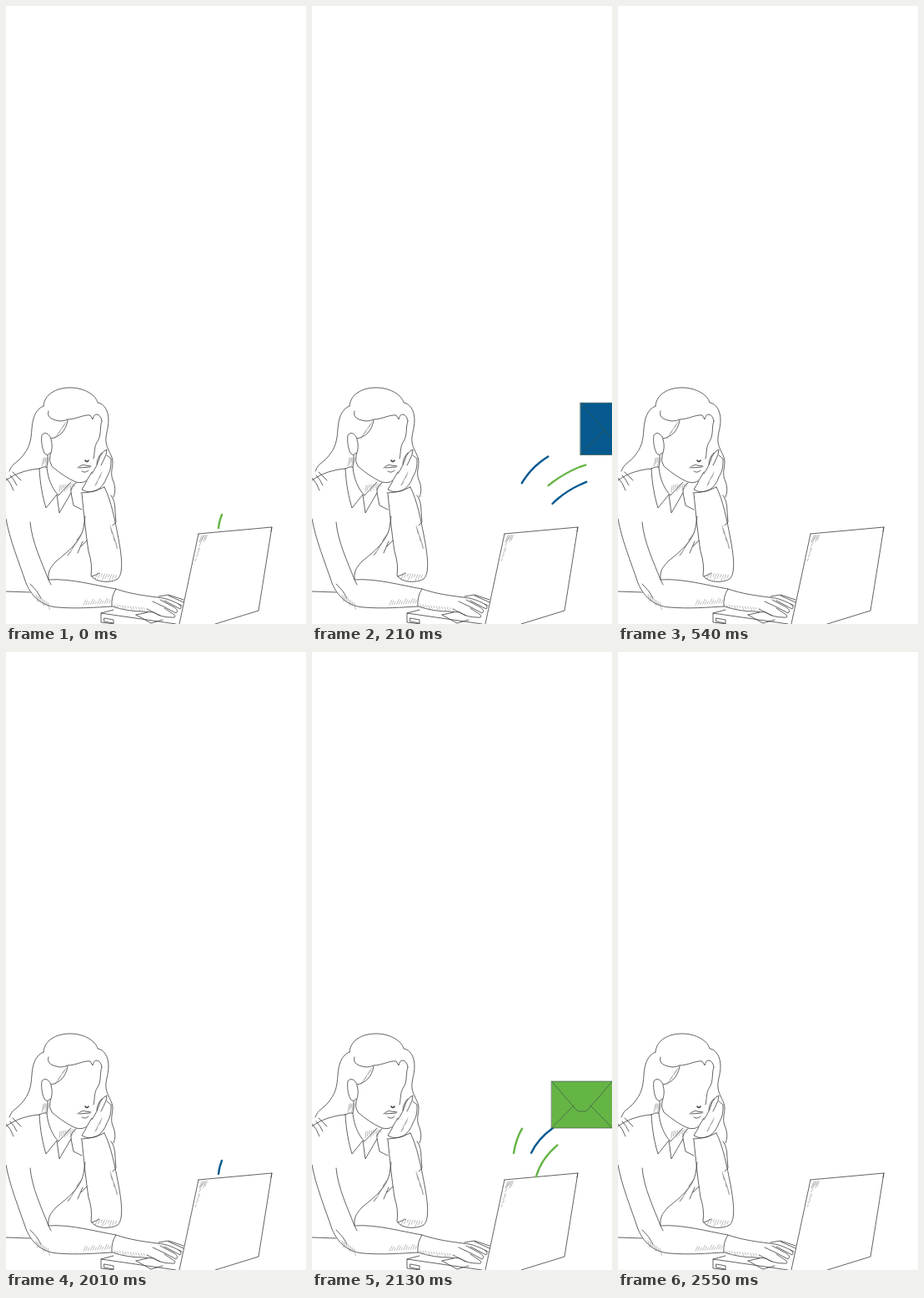
Recreate the animation shown at these times as an HTML page. Size 360x740 px, loop 3600 ms.

```html
<!DOCTYPE html>
<html lang="en">
<head>
<meta charset="utf-8">
<title>Sending mail</title>
<style>
  html, body { margin: 0; width: 100%; height: 100%; overflow: hidden; background: #fff; }
  svg { display: block; }
  path { fill: none; stroke-linecap: round; stroke-linejoin: round; }
  #drawing { stroke: #3c3c3c; stroke-width: .8; }
  #hatching { stroke: #777; stroke-width: .5; }
  #trails path { stroke-width: 2.4; }
  #envelope path { stroke: #3d5548; stroke-width: .7; vector-effect: non-scaling-stroke; }
</style>
</head>
<body>
<svg width="360" height="740" viewBox="0 0 360 740">
  <g id="drawing">
    <!-- hair -->
    <path d="M45 479C46 465 60 457 77 457C94 457 108 466 110 475C118 476 123 485 123 496C123 506 119 514 120 522C121 531 128 538 128 546C128 553 125 559 128 567C131 574 132 581 129 588"/>
    <path d="M45 479C35 483 32 494 31 506C30 522 28 529 19 540C11 549 8 547 4 557"/>
    <path d="M51 485C48 493 57 496 65 497Q70 497 74 495C84 495 93 489 101 490L104 495Q105 489 109 489Q114 490 115 497"/>
    <path d="M74 496C72 509 64 516 54 518"/>
    <!-- face and hand -->
    <path d="M54 518C52 512 46 509 43 514C42 520 43 529 46 535Q50 540 53 535"/>
    <path d="M54 519Q57 528 53 538Q51 545 55 551C63 558 74 566 84 570Q92 572 97 568L103 558"/>
    <path d="M115 497C112 505 115 513 110 521C105 528 107 536 105 542"/>
    <path d="M86 553Q92 548 95 550L102 551M88 553L101 552M91 557Q95 560 99 556"/>
    <path d="M95 544Q97 547 99 544" stroke-width="1.5"/>
    <path d="M103 560C108 553 110 548 113 539Q117 532 121 531Q121 537 117 544L114 550M109 549Q109 541 115 535M121 538L126 542C126 550 126 556 121 564Q118 574 109 580Q99 584 91 579L97 569"/>
    <path d="M50 538Q51 545 49 552M84 571Q77 576 78 583"/>
    <!-- collar and shoulders -->
    <path d="M40 554Q45 551 49 552C50 566 56 579 63 586L78 570M40 554C41 573 44 588 48 601L61 585L64 607L78 583L81 598L91 603"/>
    <path d="M40 554C27 555 12 559 0 568M0 565Q6 571 9 580M5 562Q10 567 13 574M8 558L18 568"/>
    <!-- propping arm -->
    <path d="M90 583Q104 583 118 576M91 584C93 604 96 634 99 653Q104 668 102 682C108 691 126 691 134 686C142 679 138 654 135 638C131 617 126 591 118 576M126 586Q131 592 131 605L132 618L128 622M103 683Q109 681 112 679"/>
    <!-- resting arm -->
    <path d="M0 614C4 638 16 667 24 691C32 710 46 719 62 720C86 722 108 720 127 719"/>
    <path d="M29 618C31 642 43 666 51 687C77 685 108 694 132 698Q126 707 127 719M51 686C50 675 55 671 60 665C76 652 89 642 93 625L95 611M92 641L86 655M97 640L90 647M29 692Q38 700 42 709M51 687L54 693"/>
    <path d="M132 698C149 704 166 706 181 708C194 709 201 713 211 718M128 719Q145 725 165 725L177 726Q186 732 198 732Q205 733 202 729L190 721M169 722L185 730M176 713Q192 720 204 727Q208 724 202 720L185 711M190 712L209 722Q212 719 207 716"/>
    <!-- desk and laptop -->
    <path d="M0 701L29 702M231 632L319 624L303 724L251 740M231 632L208 740M319 624L318 629M183 707L195 705L213 711M195 706L213 714"/>
    <path d="M129 723L114 727L114 738L130 740M114 727L204 740M118 733L129 735L129 739L118 737ZM156 729L170 726M156 729L174 739L188 735"/>
  </g>
  <path id="hatching"/>
  <g id="trails">
    <path d="M242 600C244 588 247 579 252 571C258 561 265 553 274 546C290 534 306 526 325 522C340 519 352 518 366 516L460 510"/>
    <path d="M255 625Q256 616 259 609L263 600C268 589 278 578 289 570Q304 559 321 552Q340 545 362 543L460 538"/>
    <path d="M269 628C273 614 283 600 295 590Q307 580 320 574Q340 564 362 562L460 557"/>
  </g>
  <g id="envelope">
    <rect x="-36.5" y="-28" width="73" height="56"/>
    <path d="M-36.5 -28H36.5V28H-36.5ZM-36.5 -28L-7 6Q-5 8 -3 8H3Q5 8 7 6L36.5 -28M-36.5 28L-10 1M36.5 28L10 1"/>
  </g>
</svg>
<script>
  const LOOP = 3600, STEP = 30, FLIGHT = 540, SECOND_START = 2010;
  const BLUE = '#05598f', GREEN = '#65b545';
  const trails = [...document.querySelectorAll('#trails path')];
  const envelope = document.getElementById('envelope');
  const body = envelope.querySelector('rect');

  // Rows of short strokes: x, y, count, step x, step y, stroke x, stroke y
  const hatch = (x, y, count, dx, dy, sx, sy) =>
    Array.from({ length: count }, (_, i) => {
      const k = 1 - (i % 3) * .25;
      return `M${x + i * dx} ${y + i * dy}l${sx * k} ${sy * k}`;
    }).join('');

  document.getElementById('hatching').setAttribute('d', [
    hatch(72, 498, 7, -1.7, 2.5, -3, 5),
    hatch(45, 541, 5, 1.5, 0, -2, 10),
    hatch(65, 574, 9, 2.2, -.3, -1, 8),
    hatch(92, 630, 9, -1.8, 3, -7, 9),
    hatch(125, 622, 8, 1, 3, 2, 9),
    hatch(110, 679, 9, 2.8, .3, -3, 7),
    hatch(36, 705, 7, 2.4, 1.6, 2, 8),
    hatch(93, 717, 12, 2.8, -.2, 3, -6),
    hatch(130, 717, 12, 3.2, .3, 2, 4),
    hatch(115, 558, 6, -1.4, 2.7, -2, 6),
    hatch(235, 634, 5, 1.6, -.1, -3, 8),
    hatch(233, 642, 6, -1.2, 4.5, 3, -5)
  ].join(''));

  // Tail and head of each trail, as distances along its path
  const spans = [
    t => [.323 * (t - 120) + .00018 * (t - 120) ** 2, 31 + .495 * (t - 120)],
    t => [.139 * t + .00069 * t * t, 16.5 + .45 * t],
    t => [.42 * (t - 120), 46 + .45 * (t - 120)]
  ];

  function drawTrail(path, [tail, head], color) {
    const start = Math.max(0, tail), length = head - start;
    path.style.display = length > 0 ? '' : 'none';
    path.style.stroke = color;
    path.style.strokeDasharray = `${Math.max(length, .1)} 9999`;
    path.style.strokeDashoffset = -start;
  }

  function drawEnvelope(t, color) {
    const x = 262 + .517 * t - .00041 * t * (t - 120);
    const y = 606 - .533 * t + .00065 * t * (t - 120);
    const scale = 1.143 * (1 - Math.exp(-t / 58));
    envelope.style.display = t > 0 && t < 390 ? '' : 'none';
    envelope.setAttribute('transform', `translate(${x} ${y}) scale(${scale})`);
    body.style.fill = color;
  }

  function render(now) {
    const time = Math.floor(now % LOOP / STEP) * STEP;
    const second = time >= SECOND_START;
    const t = second ? time - SECOND_START : time;
    const main = second ? GREEN : BLUE, accent = second ? BLUE : GREEN;
    const flying = t < FLIGHT;
    trails.forEach((path, i) =>
      drawTrail(path, flying ? spans[i](t) : [0, 0], i === 1 ? accent : main));
    drawEnvelope(flying ? t : 0, main);
  }

  const origin = performance.now();
  function tick() {
    render(performance.now() - origin);
    requestAnimationFrame(tick);
  }
  tick();
</script>
</body>
</html>
```
